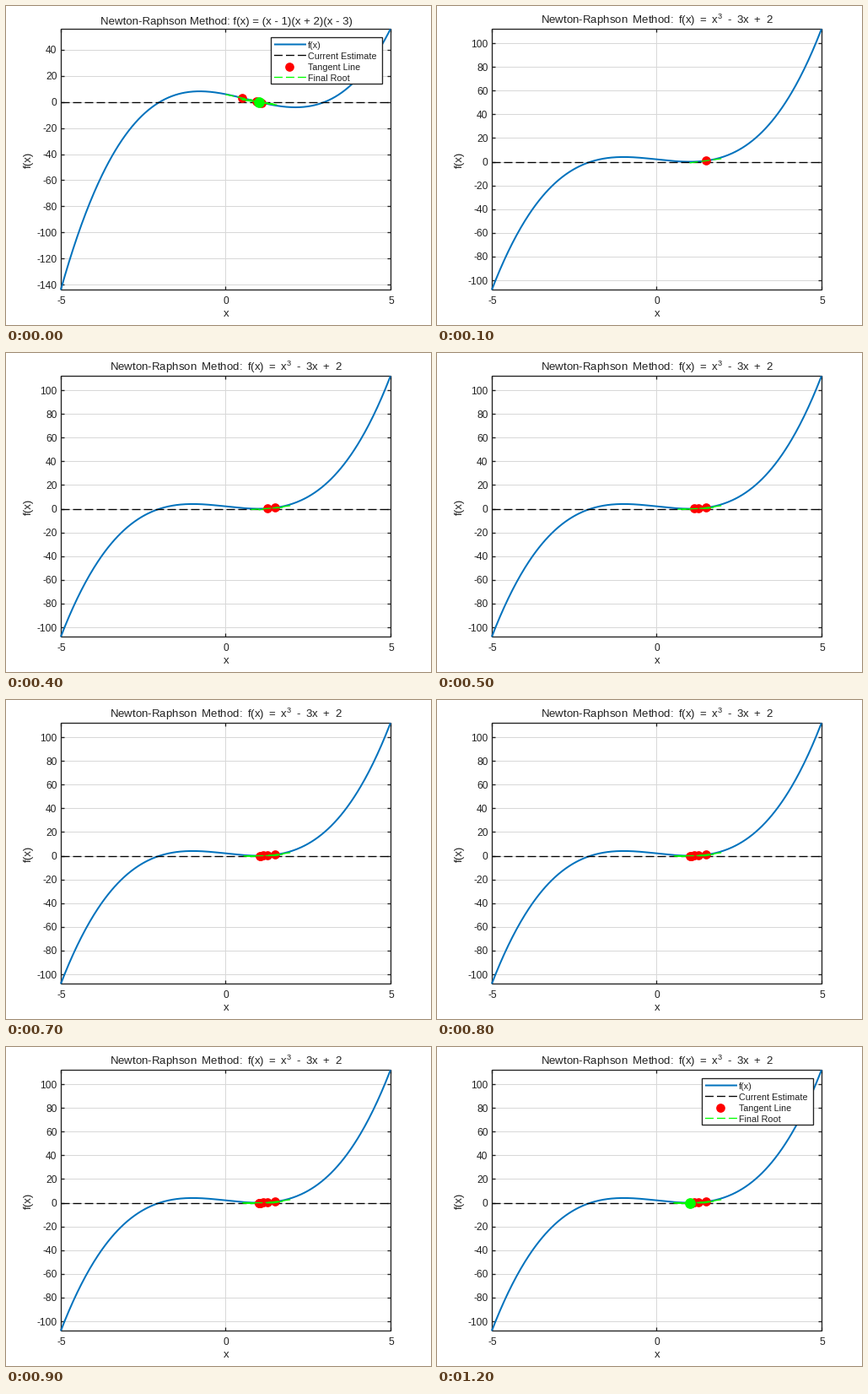
Animation, 504 px wide and 378 px high, one loop 1300 ms. Source, as a matplotlib script:

```python
import numpy as np
import matplotlib.pyplot as plt
from matplotlib.animation import FuncAnimation
from matplotlib.patches import Rectangle

plt.rcParams.update({"font.family": "Liberation Sans", "mathtext.default": "regular",
                     "path.snap": False})

# At 72 dpi one point is one pixel, so sizes below are in pixels.
W, H = 504, 378
LEFT, RIGHT, TOP, BOTTOM = 65, 455.95, 27.25, 336.25
INK, GRID, BLUE, RED, GREEN = "#212121", "#d8d8d8", "#0072bd", "#ff0000", "#00ff00"
DASH, GAP = 10, 4
THIN = 1.33

fig = plt.figure(figsize=(W / 72, H / 72), dpi=72, facecolor="white")
ax = fig.add_axes([0, 0, 1, 1])


def pixel(v):
    """Centre of the pixel that holds a straight line."""
    return np.floor(v + 0.5) + 0.5


X0, X1, Y0, Y1 = (pixel(v) for v in (LEFT, RIGHT, TOP, BOTTOM))


class Problem:
    def __init__(self, title, title_y, f, slope, start, steps):
        self.title, self.title_y, self.f, self.slope = title, title_y, f, slope
        self.low, self.high = f(-5), f(5)
        self.estimates = [start]
        for _ in range(steps):
            x = self.estimates[-1]
            self.estimates.append(x - f(x) / slope(x))

    def px(self, x):
        return LEFT + (np.asarray(x) + 5) / 10 * (RIGHT - LEFT)

    def py(self, y):
        return BOTTOM - (np.asarray(y) - self.low) / (self.high - self.low) * (BOTTOM - TOP)


FACTORED = Problem(
    "Newton-Raphson Method: f(x) = (x - 1)(x + 2)(x - 3)", 22,
    lambda x: (x - 1) * (x + 2) * (x - 3),
    lambda x: 3 * x**2 - 2 * x - 5,
    0.5, 8)
CUBIC = Problem(
    r"$\enspace$".join(["Newton-Raphson", "Method:", "f(x)", "=", "x$^3$", "-", "3x", "+", "2"]), 21,
    lambda x: x**3 - 3 * x + 2,
    lambda x: 3 * x**2 - 3,
    1.5, 7)


def line(xs, ys, color, width, dashed=False, z=2):
    style = (0, (DASH / width, GAP / width)) if dashed else "-"
    ax.plot(xs, ys, color=color, lw=width, ls=style, zorder=z,
            dash_capstyle="butt", solid_capstyle="butt")


def dot(x, y, color, size, z=2):
    ax.plot([x], [y], "o", color=color, ms=size, mew=0, zorder=z)


def label(x, y, text, size, ha="center", z=3, **kw):
    ax.text(x, y, text, fontsize=size, color=INK, ha=ha, va="baseline", zorder=z, **kw)


def draw_axes(p):
    label(261, p.title_y, p.title, 13.2)
    label(261, 368, "x", 13.2)
    label(30, 182, "f(x)", 13.2, rotation=90, rotation_mode="anchor")
    for v in (-5, 0, 5):
        x = pixel(p.px(v))
        line([x, x], [Y0, Y1], GRID, 1, z=0)
        line([x, x], [Y1, Y1 - 4], INK, THIN, z=1)
        line([x, x], [Y0, Y0 + 4], INK, THIN, z=1)
        label(p.px(v) + 0.5, 353, str(v), 12)
    for v in range(-140, 101, 20):
        if p.low <= v <= p.high:
            y = pixel(p.py(v))
            line([X0, X1], [y, y], GRID, 1, z=0)
            line([X0, X0 + 4], [y, y], INK, THIN, z=1)
            line([X1, X1 - 4], [y, y], INK, THIN, z=1)
            label(60.5, p.py(v) + 4.5, str(v), 12, "right")
    ax.add_patch(Rectangle((X0, Y0), X1 - X0, Y1 - Y0,
                           fill=False, ec=INK, lw=THIN, zorder=1))


def draw_legend():
    ax.add_patch(Rectangle((314.5, 37.5), 132, 55, fc="white", ec=INK, lw=THIN, zorder=5))
    names = ("f(x)", "Current Estimate", "Tangent Line", "Final Root")
    rows = (45.5, 58.5, 71.5, 84.5)
    for y, name in zip(rows, names):
        label(358, y + 4.5, name, 10.8, "left", z=6)
    sample = [318, 356]
    line(sample, [rows[0]] * 2, BLUE, 2, z=6)
    line(sample, [rows[1]] * 2, "black", THIN, True, z=6)
    dot(336, rows[2], RED, 10.7, z=6)
    line(sample, [rows[3]] * 2, GREEN, THIN, True, z=6)


def draw_problem(p, shown, solved):
    draw_axes(p)
    x = np.linspace(-5, 5, 400)
    line(p.px(x), p.py(p.f(x)), BLUE, 2)
    line([X0, X1], [pixel(p.py(0))] * 2, "black", THIN, True)
    for e in p.estimates[:shown]:
        dot(p.px(e), p.py(p.f(e)), RED, 10.7)
        span = np.array([e - 0.5, e + 0.5])
        line(p.px(span), p.py(p.f(e) + p.slope(e) * (span - e)), GREEN, THIN, True)
    if solved:
        root = p.estimates[-1]
        dot(p.px(root), p.py(p.f(root)), GREEN, 12.8)
        draw_legend()


def draw(i):
    ax.clear()
    ax.set(xlim=(0, W), ylim=(H, 0))
    ax.axis("off")
    if i == 0:
        draw_problem(FACTORED, 8, True)
    else:
        # The first estimate holds, then one is added per frame up to seven.
        draw_problem(CUBIC, min(max(i - 2, 1), 7), i == 12)
    return []


anim = FuncAnimation(fig, draw, frames=13, interval=100, init_func=lambda: [],
                     repeat=True, repeat_delay=0)
plt.show()
```
